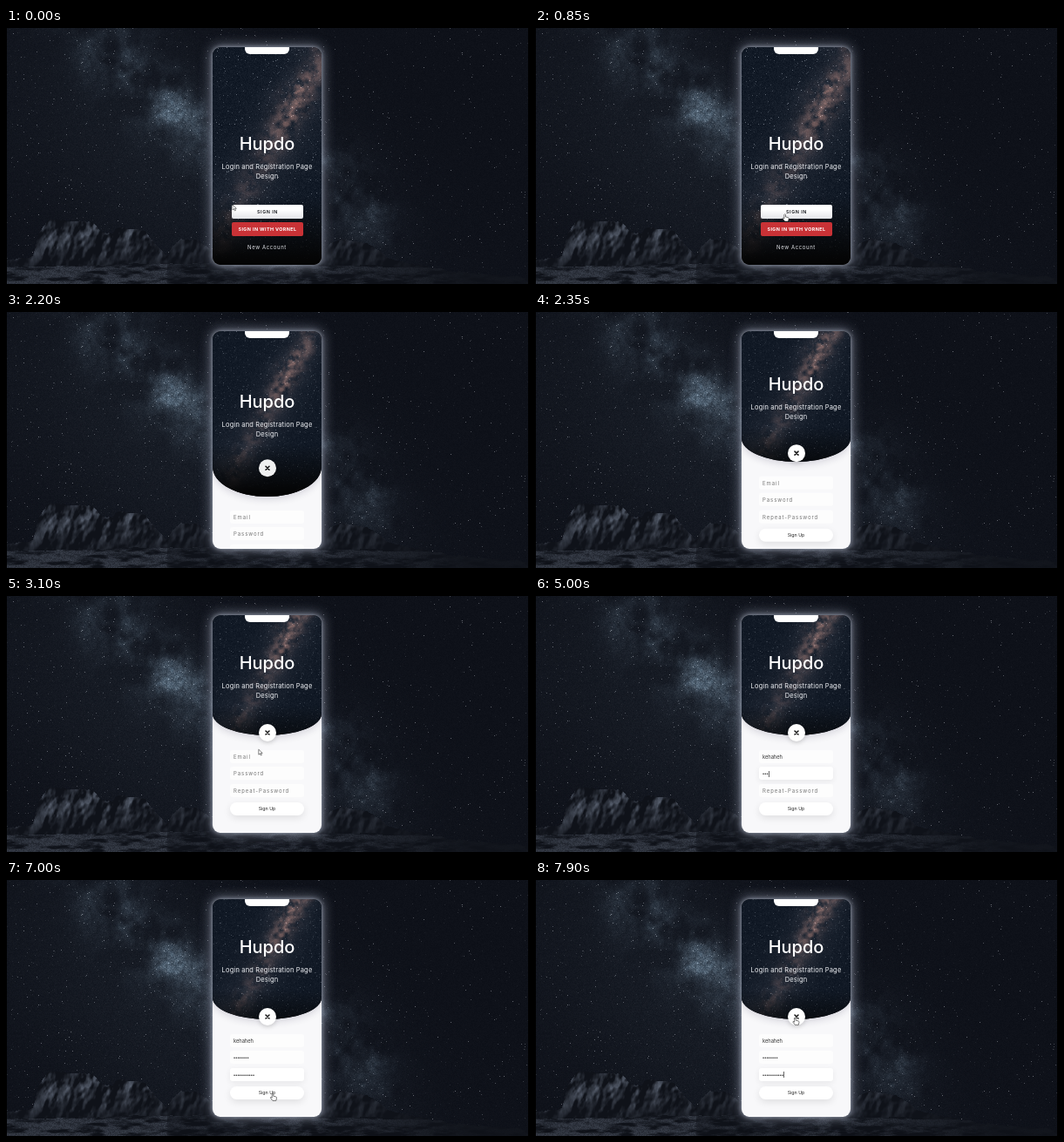
An HTML page with a canvas for the animation above (8 s loop, 600 by 294 pixels).

```html
<!DOCTYPE html>
<html lang="en">
<head>
<meta charset="utf-8">
<title>Sign-up screen</title>
<style>
html, body { margin: 0; width: 100%; height: 100%; overflow: hidden; background: #0a0d15; }
#stage { position: relative; width: 600px; height: 294px; overflow: hidden; font-family: Inter, "Open Sans", sans-serif; }
#stage * { box-sizing: border-box; }
canvas { position: absolute; left: 0; top: 0; display: block; }
#phone { position: absolute; left: 237px; top: 22px; width: 125px; height: 250px; border-radius: 9px; overflow: hidden;
  background: #f8f8fa; box-shadow: 0 0 5px rgba(205,212,230,.6), 0 0 14px 2px rgba(190,200,222,.5); }
#phone > * { position: absolute; }
#header { left: 0; top: 0; width: 125px; overflow: hidden; background: #05070c; box-shadow: 0 3px 9px rgba(30,25,60,.16); }
#galaxy { transform-origin: 0 0; }
#notch { left: 37px; top: 0; width: 51px; height: 8px; background: #fff; border-radius: 0 0 6px 6px; }
.line { left: 0; width: 125px; text-align: center; white-space: nowrap; color: #fff; }
#title { top: 99px; font: 500 20px/24px Inter, sans-serif; }
#lead { top: 132px; font-size: 7.5px; line-height: 11px; letter-spacing: .17px; color: #eef0f4; }
.button { position: absolute; left: 22px; width: 82px; height: 16.5px; border-radius: 2px; text-align: center;
  white-space: nowrap; font-size: 5.4px; line-height: 16.5px; }
#signin { top: 180.5px; color: #16181d; background: linear-gradient(#fff 35%, #e3e4e8); font-weight: 600; letter-spacing: .55px; }
#partner { top: 200.5px; color: #fff; background: #c93236; font-weight: 700; letter-spacing: .4px; }
#account { top: 224.5px; font-size: 6px; line-height: 10px; letter-spacing: .6px; color: #dfe1e6; position: absolute; }
#close { left: 52.5px; top: 125px; width: 20px; height: 20px; border-radius: 50%; background: #fff; box-shadow: 0 2px 5px rgba(0,0,0,.16); }
#form { left: 20px; top: 0; width: 85px; height: 250px; }
.field { position: absolute; left: 0; width: 85px; height: 15px; padding-left: 4px; border-radius: 3px; background: #fdfdfd;
  color: #333; font-size: 5.7px; line-height: 15px; white-space: nowrap; }
.field.focus { background: #fff; box-shadow: 0 2px 7px rgba(0,0,0,.07); }
.field .dots { font: 6px/15px "Liberation Sans", Arial, sans-serif; letter-spacing: .1px; }
.field i { display: inline-block; width: .7px; height: 7px; margin-right: -.7px; background: #666; vertical-align: middle; }
.field .hint { font-size: 6px; letter-spacing: .93px; color: #777; }
#send { position: absolute; left: 0; top: 215px; width: 85px; height: 15px; border-radius: 8px; background: #fff;
  box-shadow: 0 3px 8px rgba(0,0,0,.1); text-align: center; font-size: 5.3px; line-height: 15px; color: #222; }
#cursor { position: absolute; left: 0; top: 0; overflow: visible; }
</style>
</head>
<body>
<div id="stage">
  <canvas id="sky" width="600" height="294"></canvas>
  <div id="phone">
    <div id="form">
      <div id="send">Sign Up</div>
    </div>
    <div id="header"><canvas id="galaxy" width="167" height="250"></canvas></div>
    <div id="notch"></div>
    <div id="title" class="line">Hupdo</div>
    <div id="lead" class="line">Login and Registration Page<br>Design</div>
    <div id="menu">
      <div id="signin" class="button">SIGN IN</div>
      <div id="partner" class="button">SIGN IN WITH VORNEL</div>
      <div id="account" class="line">New Account</div>
    </div>
    <div id="close"><svg width="20" height="20"><path d="M8 8l4 4m0-4l-4 4" stroke="#111" stroke-width="1.5" stroke-linecap="round"/></svg></div>
  </div>
  <svg id="cursor" width="10" height="10" stroke-linejoin="round">
    <path id="arrow" d="M0 0v6l1.5-1.3 1 2.2 1-.5-1-2.1h1.9z" fill="#fff" stroke="#333" stroke-width=".6"/>
    <path id="hand" d="M-.8.8q.8-1.6 1.6 0v2.4l3 .8q.9.4.7 1.4l-.7 3h-3.9l-2.6-3.3q.2-1.1 1.2-.5l.7.6z" fill="#fff" stroke="#222" stroke-width=".6"/>
  </svg>
</div>
<script>
const START = performance.now(), LOOP = 8000;
const $ = id => document.getElementById(id);
const clamp = (v, lo = 0, hi = 1) => Math.min(hi, Math.max(lo, v));
const mix = (a, b, k) => a + (b - a) * k;

// Seeded value noise
function hash(x, y) {
  let h = Math.imul(x, 374761393) + Math.imul(y, 668265263) | 0;
  h = Math.imul(h ^ h >>> 13, 1274126177);
  return ((h ^ h >>> 16) >>> 0) / 4294967296;
}
function noise(x, y) {
  const i = Math.floor(x), j = Math.floor(y), u = x - i, v = y - j;
  const a = u * u * (3 - 2 * u), b = v * v * (3 - 2 * v);
  return mix(mix(hash(i, j), hash(i + 1, j), a), mix(hash(i, j + 1), hash(i + 1, j + 1), a), b);
}
function fbm(x, y) {
  let sum = 0;
  for (let amp = .5, o = 0; o < 4; o++, amp /= 2, x *= 2, y *= 2) sum += amp * noise(x, y);
  return sum / .9375;
}
const bell = v => Math.exp(-v * v);
function blob(x, y, cx, cy, rx, ry, angle) {
  const c = Math.cos(angle), s = Math.sin(angle), dx = x - cx, dy = y - cy;
  return bell((dx * c + dy * s) / rx) * bell((dy * c - dx * s) / ry);
}
function star(x, y, density) {
  return hash(x + 911, y + 57) < density ? 12 + 75 * hash(x, y + 400) ** 3 : 0;
}
function paint(canvas, shade) {
  const { width, height } = canvas, ctx = canvas.getContext('2d');
  const image = ctx.createImageData(width, height);
  for (let y = 0, p = 0; y < height; y++)
    for (let x = 0; x < width; x++, p += 4) {
      image.data.set(shade(x, y), p);
      image.data[p + 3] = 255;
    }
  ctx.putImageData(image, 0, 0);
}

const RIDGE = [[0, 266], [30, 262], [38, 233], [48, 221], [58, 219], [100, 223], [107, 232], [122, 236], [128, 228],
  [158, 232], [172, 248], [184, 262], [190, 250], [200, 242], [222, 244], [237, 258], [300, 272], [362, 262],
  [372, 246], [385, 242], [411, 246], [426, 254], [440, 265], [474, 272], [510, 279], [600, 286]];
function ridge(x) {
  const i = Math.max(1, RIDGE.findIndex(p => p[0] >= x));
  const [x0, y0] = RIDGE[i - 1], [x1, y1] = RIDGE[i];
  return mix(y0, y1, (x - x0) / (x1 - x0)) + 3 * (fbm(x / 5, 3) - .5);
}
const SKYLINE = Array.from({ length: 600 }, (_, x) => ridge(x));

// Rock faces lit from the upper left, above a snowy foreground
function land(x, y) {
  const relief = (u, v) => fbm(u / 16 + v / 60, v / 26);
  const slope = relief(x + 1.5, y + 1.5) - relief(x - 1.5, y - 1.5);
  const snowLine = 271 + 10 * (fbm(x / 40, 8) - .5);
  const dim = x > 300 ? mix(.75, .1, clamp((x - 370) / 160)) : x > 184 ? .6 : 1;
  const rock = clamp(.3 + slope * 5) * (.5 + fbm(x / 3, y / 7)) * clamp((288 - y) / 50);
  const snow = clamp(fbm(x / 15, y / 4) * 3.2 - 1.1) * (.55 + .45 * hash(x, y));
  const k = dim * (y > snowLine ? .7 * snow : rock);
  return [15 + 58 * k, 18 + 62 * k, 25 + 68 * k];
}

paint($('sky'), (x, y) => {
  if (x < 1 || x > 598) return [0, 0, 0];
  if (y > SKYLINE[x]) return land(x, y);
  const cloud = fbm(x / 30 + 5, y / 30), fine = fbm(x / 5, y / 5 + 40);
  const haze = .12 * blob(x, y, 190, 150, 250, 130, .6);
  const band = .75 * blob(x, y, 160, 68, 100, 36, .8) + .75 * blob(x, y, 197, 102, 28, 20, .8)
    + .65 * blob(x, y, 390, 188, 62, 34, .9);
  const k = haze + band * clamp(cloud * 2.1 - .55, 0, 1.3) * (.35 + .95 * fine);
  const s = star(x, y, .008 + .05 * k) + (hash(x, y) - .5) * (4 + 34 * k);
  return [14 + 72 * k + s, 17 + 87 * k + s, 25 + 96 * k + s];
});

paint($('galaxy'), (x, y) => {
  const d = x - 151 + .545 * y - 14 * (fbm(y / 22, 9) - .5);
  const dust = clamp(fbm(x / 8 + 20, y / 8) * 2.6 - .75);
  const glow = bell(d / 16) * dust * (.3 + .65 * bell((y - 62) / 42));
  const haze = bell(d / 40) * (.2 + .6 * fbm(x / 18, y / 18));
  const ground = clamp((246 - y) / 75);
  const s = star(x, y, .035) + (hash(x, y) - .5) * 12;
  return [13 + 32 * haze + 108 * glow + s, 21 + 30 * haze + 70 * glow + s, 33 + 30 * haze + 55 * glow + s]
    .map(v => 4 + v * ground);
});

// Form fields: placeholder, top, focus time, first key, key interval, final value
const FIELDS = [
  ['Email', 155, 3450, 3600, 125, 'kehaheh'],
  ['Password', 174, 4600, 4845, 75, '•'.repeat(8)],
  ['Repeat-Password', 193.5, 5700, 5900, 49, '•'.repeat(11)]
].map(([hint, top, focus, first, gap, value], i, all) => {
  const box = document.createElement('div');
  box.className = 'field';
  box.style.top = top + 'px';
  box.innerHTML = `<span class="${i ? 'dots' : ''}"></span><i></i><span class="hint">${hint}</span>`;
  $('form').append(box);
  const [text, caret, label] = box.children;
  return { box, text, caret, label, focus, first, gap, value, blur: all[i + 1] ? all[i + 1][2] : LOOP };
});
function drawField(f, t) {
  const typed = t < f.first ? 0 : Math.min(f.value.length, Math.floor((t - f.first) / f.gap) + 1);
  const lastKey = typed ? f.first + (typed - 1) * f.gap : f.focus;
  const focused = t >= f.focus && t < f.blur;
  f.text.textContent = f.value.slice(0, typed);
  f.label.style.display = typed ? 'none' : '';
  f.box.classList.toggle('focus', focused);
  f.caret.style.visibility = focused && Math.floor((t - lastKey) / 530) % 2 === 0 ? 'visible' : 'hidden';
}

// Pointer path: time, x, y, shape
const PATH = [
  [0, 260, 203, 'arrow'], [50, 260, 203, 'arrow'], [200, 267, 207, 'hand'], [550, 285, 212, 'hand'],
  [800, 285, 212, 'hand'], [950, 290, 217, 'hand'], [1250, 290, 217, 'hand'], [1650, 296, 246, 'hand'],
  [1900, 295.5, 253, 'hand'], [2090, 295.5, 253, ''], [2550, 300, 232, 'arrow'], [2850, 294, 196, 'arrow'],
  [3080, 290, 176, 'arrow'], [3200, 289, 177, 'arrow'], [3300, 288, 181, ''], [6750, 330, 235, 'arrow'],
  [6850, 318, 242, 'hand'], [7000, 306, 245, 'hand'], [7150, 306, 245, 'hand'], [7220, 305, 234, ''],
  [7470, 300, 172, 'arrow'], [7550, 299, 164, 'hand'], [7750, 299, 160, 'hand'], [7900, 298.5, 158, 'hand'],
  [LOOP, 298.5, 158, 'hand']
];
function drawCursor(t) {
  const i = PATH.findIndex(p => p[0] > t), [t0, x0, y0, shape] = PATH[i - 1], [t1, x1, y1] = PATH[i];
  const k = (t - t0) / (t1 - t0);
  $('cursor').style.transform = `translate(${mix(x0, x1, k)}px, ${mix(y0, y1, k)}px)`;
  for (const id of ['arrow', 'hand']) $(id).style.display = id === shape ? '' : 'none';
}

// cubic-bezier(.25, .1, .25, 1)
function ease(x) {
  if (x <= 0 || x >= 1) return clamp(x);
  const curve = (s, a, b) => 3 * a * s * (1 - s) ** 2 + 3 * b * s * s * (1 - s) + s ** 3;
  let lo = 0, hi = 1;
  for (let i = 0; i < 24; i++) {
    const mid = (lo + hi) / 2;
    if (curve(mid, .25, .25) < x) lo = mid; else hi = mid;
  }
  return curve(lo, .1, 1);
}

function draw(t) {
  const p = ease((t - 2045) / 500), height = mix(250, 138, p);
  const shift = (id, y) => $(id).style.transform = `translateY(${y}px)`;
  const curve = height * .18 * clamp(p * 2);
  const cover = Math.max(height / 250, 125 / 167);
  $('header').style.height = height + 'px';
  $('header').style.borderRadius = `0 0 50% 50% / 0 0 ${curve}px ${curve}px`;
  $('galaxy').style.transform = `translate(${62.5 - 83.5 * cover}px, ${height / 2 - 125 * cover}px) scale(${cover})`;
  shift('title', -56 * p);
  shift('lead', -56 * p);
  shift('form', 110 * (1 - p));
  shift('close', 48 * (1 - p));
  $('close').style.opacity = clamp(p * 1.75);
  $('menu').style.display = p > 0 ? 'none' : '';
  FIELDS.forEach(f => drawField(f, t));
  drawCursor(t);
}
function tick() {
  draw((performance.now() - START) % LOOP);
  requestAnimationFrame(tick);
}
tick();
</script>
</body>
</html>
```
